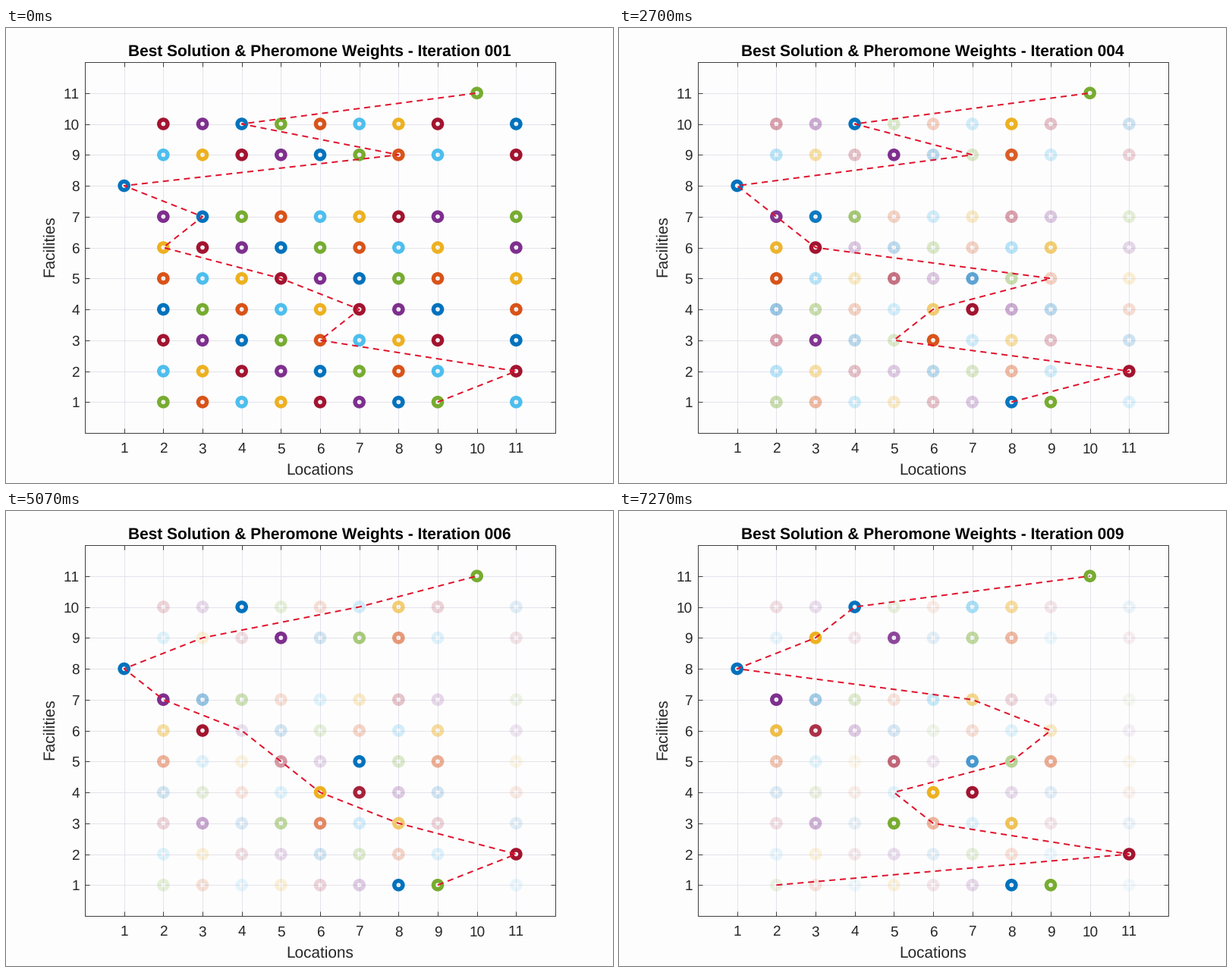
A matplotlib script that plays this animation: 800 px wide and 600 px high, repeating every 8 s.

```python
import numpy as np
import matplotlib.pyplot as plt
from matplotlib.animation import FuncAnimation

plt.rcParams["font.family"] = "Liberation Sans"
plt.rcParams["text.hinting"] = "none"
plt.rcParams["text.kerning_factor"] = 6  # even spacing, no pair kerning

WIDTH, HEIGHT, DPI = 800, 600, 100
PX = 72 / DPI
LEFT, RIGHT, TOP, BOTTOM = 104, 724, 45, 534
N = 11
INTERVAL, LOOP, ITERATION_MS = 100, 8000, 900

PAPER, GRID, FRAME, INK, RED = "#fdfdfd", "#e3e3eb", "#404040", "#262626", "#e0142d"
COLORS = ["#0072bd", "#d95319", "#edb120", "#7e2f8e", "#77ac30", "#4dbeee", "#a2142f"]

# Location of each facility in the first solution
FIRST_TOUR = (9, 11, 6, 7, 5, 2, 3, 1, 8, 4, 10)
# Each later solution passes some locations on around these cycles
EXCHANGES = [
    [(9, 8, 5, 7, 6, 3, 2)],
    [(8, 9, 3, 6, 7, 2, 4)],
    [(9, 8, 4, 2), (6, 5, 7)],
    [(8, 9, 7, 5)],
    [(7, 5, 3, 4)],
    [(9, 8, 5), (6, 7, 4, 2)],
    [(8, 9), (7, 6)],
    [(9, 2), (5, 6)],
]
# Fixed pairs: facility -> location
FIXED = {8: 1, 11: 10}
DEPOSIT, EVAPORATION = 1.4, 0.05


def px(location):
    return LEFT + (RIGHT - LEFT) * np.asarray(location) / (N + 1)


def py(facility):
    return BOTTOM - (BOTTOM - TOP) * np.asarray(facility) / (N + 1)


def allowed(location, facility):
    if facility in FIXED:
        return FIXED[facility] == location
    return location not in FIXED.values()


def exchange(tour, cycles):
    following = {a: b for c in cycles for a, b in zip(c, c[1:] + c[:1])}
    return [following.get(location, location) for location in tour]


def pheromone_weights(tours):
    """Weights per iteration, scaled by the largest in each location."""
    tau = np.ones((N, N))
    history = []
    for tour in tours:
        history.append(tau / tau.max(axis=1, keepdims=True))
        tau = tau.copy()
        tau[np.array(tour) - 1, np.arange(N)] += DEPOSIT
        tau *= 1 - EVAPORATION
    return history


tours = [FIRST_TOUR]
for cycles in EXCHANGES:
    tours.append(exchange(tours[-1], cycles))
weights = pheromone_weights(tours)
cells = np.array([(x, y) for x in range(1, N + 1) for y in range(1, N + 1)
                  if allowed(x, y)])

fig = plt.figure(figsize=(WIDTH / DPI, HEIGHT / DPI), dpi=DPI, facecolor=PAPER)
ax = fig.add_axes([0, 0, 1, 1])
ax.set_xlim(0, WIDTH)
ax.set_ylim(HEIGHT, 0)
ax.axis("off")


def stroke(xs, ys, color, order):
    ax.plot(xs, ys, color=color, lw=PX, zorder=order, solid_capstyle="butt")


def label(x, y, text, size, **style):
    style = {"color": INK, "ha": "center", "va": "baseline", **style}
    return ax.text(x, y, text, fontsize=size * PX, **style)


TICK = 6
for i in range(1, N + 1):
    x, y = px(i), py(i)
    stroke([x, x], [TOP, BOTTOM], GRID, 1)
    stroke([LEFT, RIGHT], [y, y], GRID, 1)
    for edge, inward in ((TOP, TICK), (BOTTOM, -TICK)):
        stroke([x, x], [edge, edge + inward], FRAME, 2)
    for edge, inward in ((LEFT, TICK), (RIGHT, -TICK)):
        stroke([edge, edge + inward], [y, y], FRAME, 2)
    label(x, 560.5, str(i), 19)
    label(97, y + 7, str(i), 19, ha="right")
stroke([LEFT, RIGHT, RIGHT, LEFT, LEFT], [TOP, TOP, BOTTOM, BOTTOM, TOP], FRAME, 2)

label(413.5, 589, "Locations", 20.8)
label(63, 288, "Facilities", 20.8, rotation=90, rotation_mode="anchor")
title = label(413.5, 36.5, "", 20.9, color="black", weight="bold")

rings = ax.scatter(px(cells[:, 0]), py(cells[:, 1]), s=(11.2 * PX) ** 2,
                   facecolors="none", linewidths=5.4 * PX, zorder=3)
route, = ax.plot([], [], color=RED, lw=2 * PX, ls=(0, (4, 3)),
                 dash_capstyle="butt", zorder=4)

column, row = cells.T - 1
ring_colors = [COLORS[i % len(COLORS)] for i in N * column + row]


def draw(frame):
    k = frame * INTERVAL // ITERATION_MS
    title.set_text(f"Best Solution & Pheromone Weights - Iteration {k + 1:03d}")
    rings.set_edgecolors(list(zip(ring_colors, weights[k][column, row])))
    route.set_data(px(tours[k]), py(range(1, N + 1)))
    return title, rings, route


animation = FuncAnimation(fig, draw, frames=LOOP // INTERVAL, interval=INTERVAL,
                          repeat=True, repeat_delay=0, blit=False)
plt.show()
```
